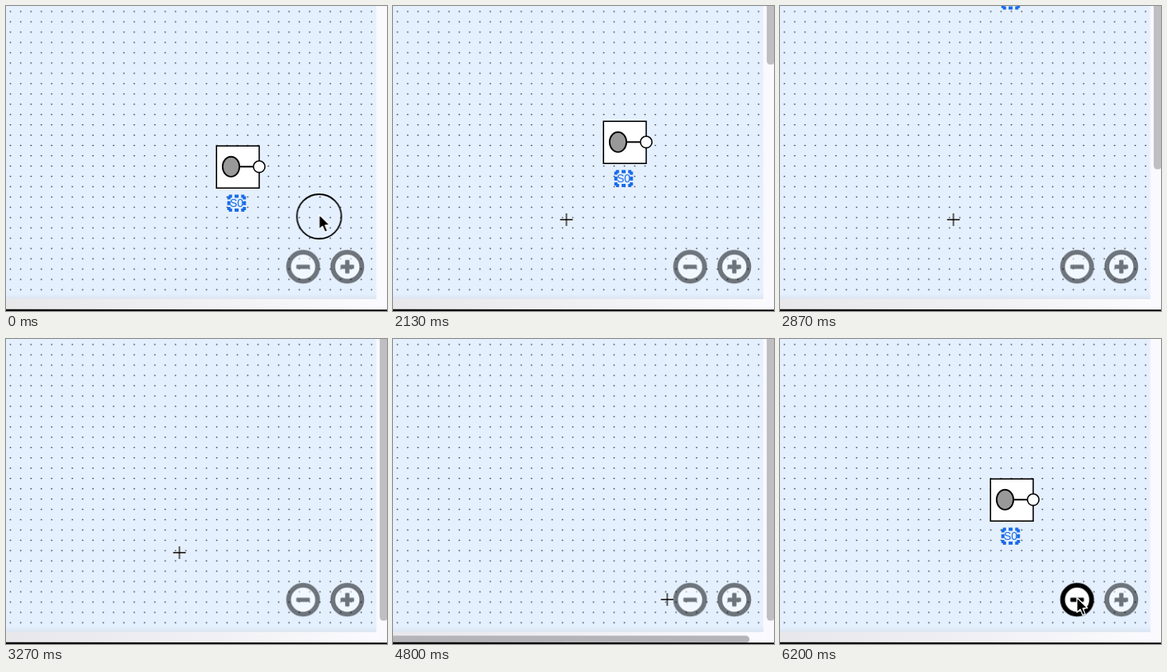
An HTML page that plays this animation: 480 px wide and 384 px high, repeating every 6.67 s.

```html
<!DOCTYPE html>
<html lang="en">
<head>
<meta charset="utf-8">
<title>Zoom and scroll on a circuit canvas</title>
<style>
  @property --scroll { syntax: "<number>"; inherits: true; initial-value: 0; }

  html, body { margin: 0; width: 100%; height: 100%; overflow: hidden; }
  svg { display: block; width: 480px; height: 384px; }

  /* One percent of the loop is one step of about 67 ms. */
  .anim { animation: 6670ms step-end -5ms infinite; }

  #view { animation-name: scroll; }
  #part { transform: translateY(calc(var(--scroll) * -1px)); }
  #thumb-y { animation-name: zoomed; transform: translateY(calc(var(--scroll) * .59px)); }
  #thumb-x { animation-name: slide; }
  #plus { animation-name: hover-plus; }
  #minus { animation-name: hover-minus; }
  #pointer { animation-name: move; }
  #arrow { animation-name: arrow; }
  #hand { animation-name: hand; }
  #cross { animation-name: cross; }
  #ring { animation-name: click; }

  @keyframes scroll {
    0% { --scroll: 0; }
    29% { --scroll: 0; animation-timing-function: steps(3); }
    32% { --scroll: 31; animation-timing-function: steps(7); }
    39% { --scroll: 95; animation-timing-function: steps(4); }
    43% { --scroll: 254.5; animation-timing-function: steps(6); }
    49% { --scroll: 507; }
    85%, 100% { --scroll: 0; }
  }
  @keyframes zoomed {
    0% { opacity: 0; }
    16% { opacity: 1; }
    85%, 100% { opacity: 0; }
  }
  @keyframes slide {
    0% { transform: translateX(-37px); }
    54% { transform: translateX(-37px); animation-timing-function: steps(11); }
    65% { transform: translateX(449px); }
    85%, 100% { transform: translateX(-37px); }
  }
  @keyframes hover-plus {
    0% { opacity: .52; }
    10% { opacity: 1; }
    21%, 100% { opacity: .52; }
  }
  @keyframes hover-minus {
    0% { opacity: .52; }
    74%, 100% { opacity: 1; }
  }
  @keyframes move {
    0% { transform: translate(394.5px, 265px); }
    5% { transform: translate(394.5px, 265px); animation-timing-function: steps(4); }
    9% { transform: translate(416px, 299px); animation-timing-function: steps(4); }
    13% { transform: translate(434.5px, 328px); }
    21% { transform: translate(400px, 312px); }
    22% { transform: translate(330px, 293px); }
    23% { transform: translate(245px, 276px); }
    24% { transform: translate(197px, 268px); }
    25% { transform: translate(218.5px, 269px); }
    66% { transform: translate(218.5px, 269px); animation-timing-function: steps(3); }
    69% { transform: translate(264px, 299px); animation-timing-function: steps(3); }
    72% { transform: translate(345.5px, 328px); animation-timing-function: steps(4); }
    76%, 100% { transform: translate(374px, 328px); }
  }
  @keyframes arrow {
    0% { opacity: 1; }
    10% { opacity: 0; }
    90%, 100% { opacity: 1; }
  }
  @keyframes hand {
    0% { opacity: 0; }
    10% { opacity: 1; }
    21% { opacity: 0; }
    74% { opacity: 1; }
    90%, 100% { opacity: 0; }
  }
  @keyframes cross {
    0% { opacity: 0; }
    21% { opacity: 1; }
    74%, 100% { opacity: 0; }
  }
  @keyframes click {
    0% { r: 28px; }
    1% { r: 16px; }
    2% { r: 0; }
    15% { r: 40px; }
    16% { r: 22px; }
    17% { r: 0; }
    83% { r: 40.5px; }
    85% { r: 28px; }
    86% { r: 16px; }
    87%, 100% { r: 0; }
  }
</style>
</head>
<body>
<svg viewBox="0 0 480 384" xmlns="http://www.w3.org/2000/svg">
  <defs>
    <pattern id="dots" x="-1.2" y="0.4" width="13" height="12.97" patternUnits="userSpaceOnUse">
      <circle cx="6.7" cy="6.5" r=".85" fill="#20242c"/>
    </pattern>
    <linearGradient id="track">
      <stop offset="0" stop-color="#e8e8eb"/>
      <stop offset=".5" stop-color="#f0f0f3"/>
      <stop offset="1" stop-color="#fbfafd"/>
    </linearGradient>
    <linearGradient id="edge" x2="0" y2="1">
      <stop offset="0" stop-color="#e5f0fe"/>
      <stop offset="1" stop-color="#dce5f1"/>
    </linearGradient>
    <g id="disc">
      <circle r="18.3" fill="#fff" stroke="#000" stroke-width="6"/>
      <rect x="-8.5" y="-2.6" width="17" height="5.4" rx="1"/>
    </g>
  </defs>

  <g id="view" class="anim">
    <rect width="480" height="384" fill="#faf9fe"/>
    <rect width="466.5" height="369" fill="#e5f0fe"/>
    <rect y="362" width="466.5" height="7" fill="url(#edge)"/>
    <rect width="466.5" height="362" fill="url(#dots)"/>

    <g id="part">
      <g fill="#fff" stroke="#000" stroke-width="1.6">
        <rect x="265.2" y="176.2" width="53.8" height="53"/>
        <ellipse cx="283.5" cy="202.3" rx="10.6" ry="12.6" fill="#999" stroke-width="1.9"/>
        <path d="M294 202.3H312" stroke-width="2"/>
        <circle cx="319" cy="202.3" r="7.3"/>
      </g>
      <rect x="280.8" y="239.5" width="19.5" height="17.5" fill="#e5f0fe" stroke="#176be8" stroke-width="4"
        stroke-dasharray="4 3.25 5 3.25 4 0 4 2.25 5 2.25 4 0"/>
      <text x="290.6" y="253.4" text-anchor="middle" font-family="'Liberation Sans', Arial, sans-serif"
        font-size="14" fill="#176be8">S0</text>
    </g>

    <rect y="369" width="470" height="13" fill="url(#track)"/>
    <rect id="thumb-y" class="anim" x="470.8" y="-444.4" width="10" height="500" rx="4.8" fill="#bfbec3"/>
    <rect id="thumb-x" class="anim" x="-600" y="373.5" width="600" height="9" rx="4.5" fill="#b5b5b9"/>
    <path d="M0 381.7L480 382.3V384H0Z"/>

    <g transform="translate(374.3 328.2)">
      <use id="minus" class="anim" href="#disc"/>
    </g>
    <g transform="translate(430 328.2)">
      <g id="plus" class="anim">
        <use href="#disc"/>
        <rect x="-2.7" y="-8.4" width="5.4" height="17" rx="1"/>
      </g>
    </g>

    <g id="pointer" class="anim">
      <circle id="ring" class="anim" fill="none" stroke="#000" stroke-width="1.8"/>
      <path id="arrow" class="anim" d="M0 -2.5V16.2L4.3 12.3L7.3 19.6L10.5 18.2L7.5 11.1L13.4 10.7Z"
        stroke="#fff" stroke-width="1.2" stroke-linejoin="round"/>
      <g id="hand" class="anim" fill="#fff" stroke="#000" stroke-width="1.3" stroke-linejoin="round">
        <path d="M-3 13V3a1.8 1.8 0 0 1 3.6 0V9.5a1.8 1.8 0 0 1 3.6 .4a1.7 1.7 0 0 1 3.4 .8a1.6 1.6 0 0 1 3.2 .9V15.5c0 2-1.6 3.5-1.6 6H0c0-2.5-2.5-4-4-6.5c-1-1.8-2.8-3-3-4c-.3-1.6 1.8-2 4 2z"/>
        <path d="M1.8 14V18.5M4.2 14V18.5M6.6 14V18.5" stroke-width="1"/>
      </g>
      <g id="cross" class="anim" fill="none">
        <path d="M-8.5 0H8.5M0 -8.5V8.5" stroke="#fff" stroke-width="2.6" opacity=".6"/>
        <path d="M-8 0H8M0 -8V8" stroke="#000" stroke-width="1.3"/>
      </g>
    </g>
  </g>
</svg>
</body>
</html>
```
